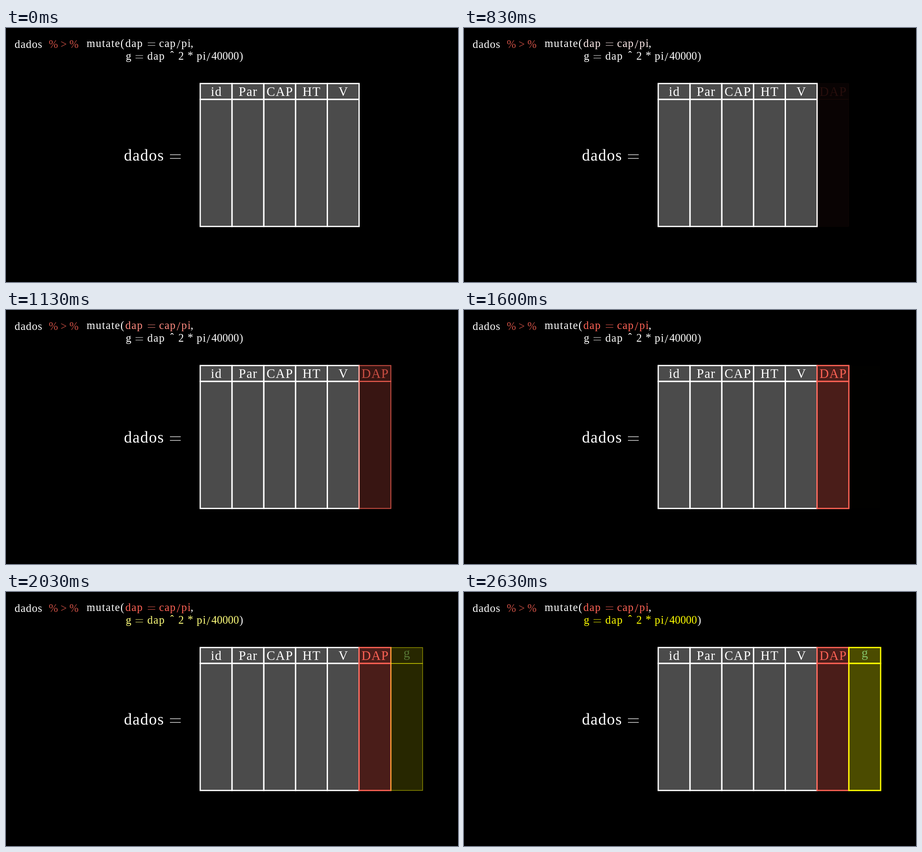
These frames come from a looping animation (998 px wide and 561 px high, 3510 ms). An HTML page with a canvas:

```html
<!DOCTYPE html>
<html lang="pt">
<head>
<meta charset="utf-8">
<title>Adding columns to a table</title>
<style>
  html, body { margin: 0; height: 100%; overflow: hidden; background: #000; }
  canvas { display: block; }
</style>
</head>
<body>
<canvas id="stage" width="998" height="561"></canvas>
<script>
const ctx = document.getElementById('stage').getContext('2d');
const LOOP = 3510, START = 525, FADE = 1000;
const UNIT = 70.15, LEFT = 428.85, TOP = 122.65, HEADER = UNIT / 2, BODY = UNIT * 4;
const WHITE = [255, 255, 255], RED = [252, 98, 85], YELLOW = [255, 255, 0], GREEN = [131, 193, 103];
const DIM_RED = [205, 80, 69];
const SMALL = 24.3, LARGE = 35, LABEL = 28.4;

const rgb = (c, alpha = 1) => `rgba(${c.join()},${alpha})`;
const mix = (a, b, p) => a.map((v, i) => Math.round(v + (b[i] - v) * p));
const sigmoid = x => 1 / (1 + Math.exp(-x));

// Sigmoid easing, rescaled to run from 0 to 1
function smooth(t) {
  const edge = sigmoid(-5), x = Math.min(1, Math.max(0, t));
  return (sigmoid(10 * (x - 0.5)) - edge) / (1 - 2 * edge);
}

function setFont(size, spacing) {
  ctx.font = `${size}px "Liberation Serif", "Times New Roman", serif`;
  ctx.letterSpacing = `${size * spacing}px`;
  ctx.fontKerning = 'none';
}

function text(str, x, y, color = WHITE, spacing = 0.06, size = SMALL) {
  setFont(size, spacing);
  ctx.fillStyle = rgb(color);
  ctx.fillText(str, x, y);
}

function equals(x, baseline, color = WHITE, size = SMALL) {
  ctx.fillStyle = rgb(color);
  for (const rise of [0.367, 0.133])
    ctx.fillRect(x, baseline - size * (rise + 0.02), size * 0.68, size * 0.036);
}

// The slash is taller than the letters around it
const slash = (x, baseline, color) => text('/', x, baseline + 3, color, 0, 28);

function column(index, label, color, labelColor = color, p = 1, baseline = 149.8) {
  const x = LEFT + index * UNIT;
  if (p <= 0) return;
  ctx.lineWidth = 2.8 * p;
  ctx.strokeStyle = rgb(color, p);
  for (const [y, h] of [[TOP, HEADER], [TOP + HEADER, BODY]]) {
    ctx.fillStyle = rgb(color, 0.295 * p);
    ctx.fillRect(x, y, UNIT, h);
    ctx.strokeRect(x, y, UNIT, h);
  }
  const spacing = 0.045;
  setFont(LABEL, spacing);
  const width = ctx.measureText(label).width - LABEL * spacing;
  ctx.fillStyle = rgb(labelColor, p);
  ctx.fillText(label, x + (UNIT - width) / 2, baseline);
}

function draw(ms) {
  const first = smooth((ms - START) / FADE), second = smooth((ms - START - FADE) / FADE);
  const red = mix(WHITE, RED, first), yellow = mix(WHITE, YELLOW, second);
  ctx.fillStyle = '#000';
  ctx.fillRect(0, 0, 998, 561);

  text('dados', 19, 43.7, WHITE, 0.042);
  text('%', 94.5, 43.7, DIM_RED);
  text('>', 120.5, 43.7, DIM_RED);
  text('%', 140, 43.7, DIM_RED);

  text('mutate(', 178, 41.7);
  text('dap', 263.5, 41.7, red);
  equals(313, 41.7, red);
  text('cap', 338, 41.7, red, 0.05);
  slash(377, 41.7, red);
  text('pi', 387.3, 41.7, red);
  text(',', 407.5, 41.7);

  text('g', 264.5, 69.7, yellow);
  equals(286, 69.7, yellow);
  text('dap', 312, 69.7, yellow);
  text('ˆ', 362.5, 68.7, yellow);
  text('2', 380.5, 69.7, yellow);
  text('*', 401, 69.2, yellow);
  text('pi', 421, 69.7, yellow);
  slash(443, 69.7, yellow);
  text('40000', 453.6, 69.7, yellow, 0);
  text(')', 515.5, 69.7);

  text('dados', 260.5, 292.8, WHITE, 0.042, LARGE);
  equals(362, 292.8, WHITE, LARGE);

  ['id', 'Par', 'CAP', 'HT', 'V'].forEach((label, i) => column(i, label, WHITE));
  column(5, 'DAP', RED, RED, first);
  column(6, 'g', YELLOW, GREEN, second, 143.8);
}

function tick() {
  draw(performance.now() % LOOP);
  requestAnimationFrame(tick);
}
tick();
</script>
</body>
</html>
```
